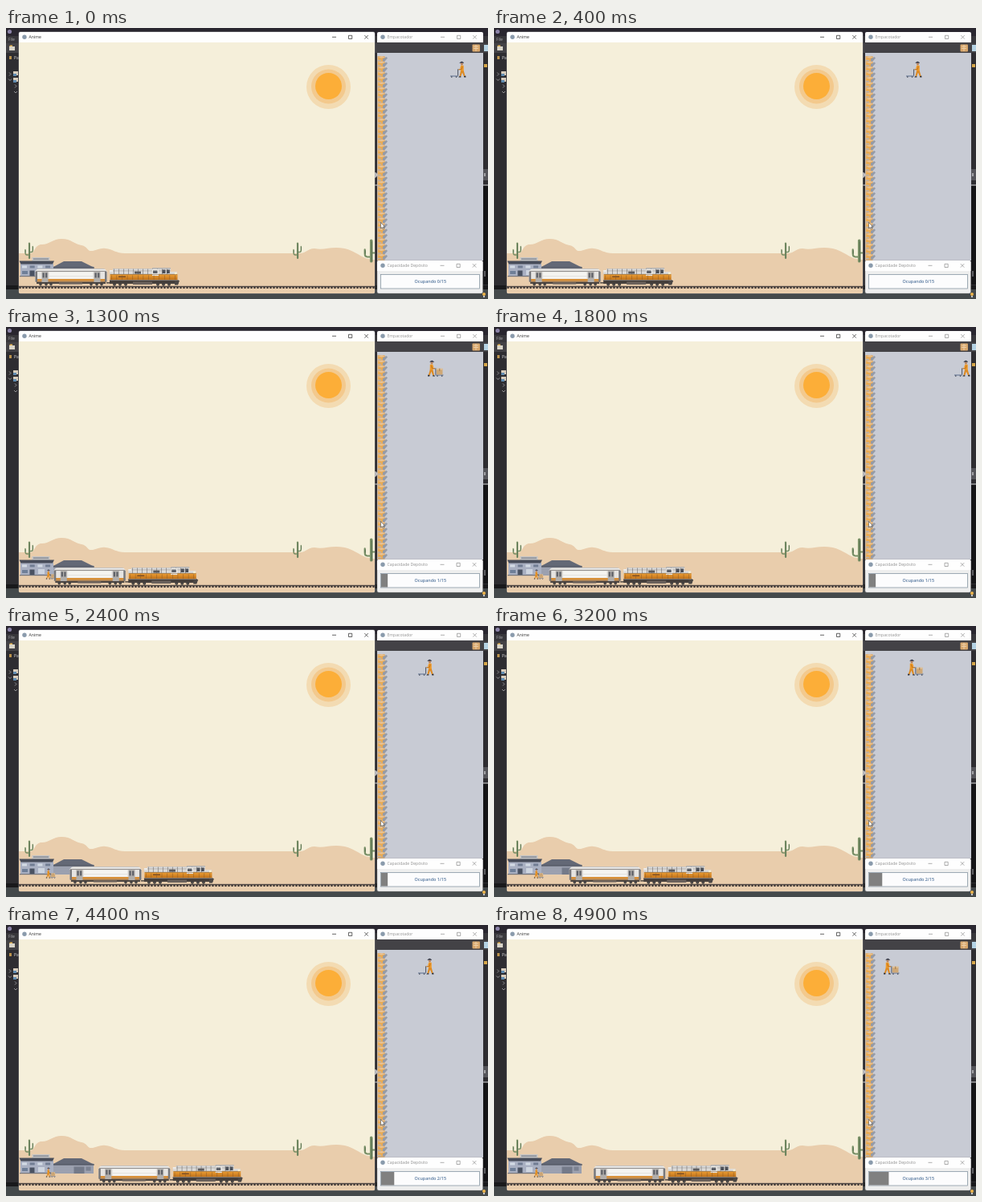
An HTML page that plays this animation: 600 by 338 pixels, repeating every 5 s.

```html
<!DOCTYPE html>
<html lang="pt">
<head>
<meta charset="utf-8">
<title>Anime</title>
<style>
html, body { margin: 0; width: 100%; height: 100%; overflow: hidden; background: #2d2c30; }
svg { display: block; width: 600px; height: 338px; }
text { font-family: "Open Sans", "Noto Sans", sans-serif; }
</style>
</head>
<body>
<svg id="stage" viewBox="0 0 600 338" xmlns="http://www.w3.org/2000/svg">
  <defs>
    <clipPath id="sceneClip"><rect x="16" y="5" width="443" height="326" rx="2"/></clipPath>
    <clipPath id="yardClip"><rect x="462" y="31" width="132" height="259"/></clipPath>
    <linearGradient id="roof" x2="0" y2="1">
      <stop stop-color="#aaa8a7"/><stop offset=".4" stop-color="#f0efed"/><stop offset="1" stop-color="#c9c7c5"/>
    </linearGradient>
    <linearGradient id="paint" x2="0" y2="1">
      <stop stop-color="#efa137"/><stop offset="1" stop-color="#bd6f18"/>
    </linearGradient>
    <g id="man">
      <path d="M3 2.2Q5.5-.6 7.6 1.7L8.8 2.7H3.2Z" fill="#2d3140"/>
      <path d="M4 2.7H7V4.6L6 5.6 4.2 5Z" fill="#b98663"/>
      <path d="M3.3 5.8 6.6 5.5 7.6 8.2 7 13H3.2Z" fill="#ef9a28"/>
      <path d="M3.2 12.5H7L8.6 19.6H6.8L5 14.5 3 19.4 1.4 19Z" fill="#dd8a22"/>
      <path d="M.8 18.6 3 19.2 2.7 20.4H.5ZM6.7 19.2H8.7L9.6 20.6H6.7Z" fill="#24262e"/>
      <path d="M4.8 7 6 10.4 9.6 10.9" fill="none" stroke="#c77a20" stroke-width="1.2"/>
    </g>
    <g id="cart">
      <path d="M10.4 10.4V18.7" stroke="#4b5261"/>
      <path d="M10 19H20" stroke="#73839d" stroke-width="1.3"/>
      <circle cx="12.5" cy="20.1" r=".8" fill="#3b4250"/><circle cx="18.2" cy="20.1" r=".8" fill="#3b4250"/>
    </g>
    <g id="box">
      <path d="M11.4 10.8H19V18.4H11.4Z" fill="#cfa876"/>
      <path d="M11.4 10.8H19V12.4H11.4Z" fill="#e0c29a"/>
      <path d="M14.6 10.8H15.8V14H14.6Z" fill="#ac834f"/>
    </g>
    <g id="cactus" fill="none" stroke="#788f66" stroke-linecap="round" stroke-linejoin="round">
      <path d="M7 20V1.5" stroke-width="2.2"/>
      <path d="M7 16H4Q2 16 2 13V9.5M7 12.5H9.5Q11.3 12.5 11.3 10V5.5" stroke-width="1.4"/>
      <path d="M7.5 20V2.5M2.3 13V10.5M11.6 10V6.5" stroke="#526b4c" stroke-width=".6"/>
    </g>
  </defs>

  <g id="desktop">
    <rect width="600" height="338" fill="#2e2d31"/>
    <rect width="600" height="10" fill="#29262f"/>
    <rect y="10" width="600" height="9" fill="#38373b"/>
    <rect y="19" width="600" height="12" fill="#434246"/>
    <rect x="594" y="196" width="6" height="124" fill="#141416"/>
    <rect y="321" width="600" height="5" fill="#19191b"/>
    <rect y="326" width="600" height="12" fill="#44494b"/>
    <circle cx="4.5" cy="4.5" r="2.6" fill="#8b83a8"/>
    <text x="3" y="16" font-size="5" fill="#a9a9ad">File</text>
    <rect x="4" y="23" width="7" height="5" fill="#d8d4c8"/>
    <path d="M4 23H8V21.5H5Z" fill="#e7b756"/>
    <rect x="4" y="35" width="3" height="4" fill="#b9914c"/>
    <text x="10" y="39" font-size="5" fill="#e0e0e2">Pa</text>
    <path d="M4 55.5 6 57.5 4 59.5M3 63.5 5 65.5 7 63.5M11 70.5 13 72.5 11 74.5M10 79 12 81 14 79" fill="none" stroke="#bdbdc1" stroke-width=".7"/>
    <path d="M9 54H15V59H9ZM9 62H15V67H9Z" fill="#d8cdbc"/>
    <path d="M9 57H13V60H9ZM9 65H13V68H9Z" fill="#608bb0"/>
    <rect x="594" y="176" width="6" height="14" fill="#55555a"/>
    <path d="M459 180Q462 180 462 183T459 187Z" fill="#c7c7ca"/>
    <path d="M595 181H597V185H595Z" fill="#a5a5a9"/>
    <path d="M459 196H462M594 196H600" stroke="#dedee0"/>
    <rect x="595" y="21" width="5" height="8" fill="#b5d3e4"/>
    <path d="M595 45H599V49H595Z" fill="#d9a94b"/>
    <path d="M596 303V310" stroke="#aaaab0"/>
    <circle cx="595" cy="332" r="2" fill="#f0b64c"/>
    <rect x="594" y="334" width="2" height="2" fill="#c7c7ca"/>
  </g>

  <rect x="15.6" y="4.6" width="443.8" height="326.8" rx="2.4" fill="#77777a"/>
  <g clip-path="url(#sceneClip)">
    <rect x="16" y="18" width="443" height="313" fill="#f5efda"/>
    <circle cx="401.5" cy="73.5" r="27.5" fill="#f3dbb2"/>
    <circle cx="401.5" cy="73" r="21.5" fill="#f3c98d"/>
    <circle cx="401.5" cy="72.5" r="16.5" fill="#fcae38"/>
    <path d="M16 281H31C36 280 35 272 43 270 53 271 58 263 69 263 82 263 85 270 94 271 103 273 100 279 108 278 114 277 117 274 124 275 133 276 137 281 148 281H366C374 281 375 275 384 275 394 277 401 274 411 274 425 274 430 278 438 282 446 287 452 289 459 289V331H16Z" fill="#e9cdac"/>
    <use href="#cactus" transform="translate(22 267)"/>
    <use href="#cactus" transform="translate(356 267)"/>
    <use href="#cactus" transform="translate(443.5 263) scale(1.6 1.4)"/>
    <g id="station"></g>
    <g id="track"></g>
    <g id="porter" transform="translate(49.5 302) scale(.61)">
      <use href="#man"/><use href="#cart"/><use href="#box"/>
    </g>
    <g id="train"></g>
  </g>

  <g id="yard">
    <rect x="462" y="31" width="132" height="259" fill="#c8cbd4"/>
    <rect x="462" y="18" width="132" height="13" fill="#434246"/>
    <rect x="580.5" y="20.5" width="9.5" height="9" rx="1" fill="#d7a66b"/>
    <path d="M582 23H588M582 25.5H588M585 21V29" stroke="#f2d9b5" stroke-width=".8"/>
    <g clip-path="url(#yardClip)">
      <g id="crates"></g>
      <g id="worker">
        <g id="body"><use href="#man"/><use href="#cart"/><use id="load" href="#box"/></g>
      </g>
    </g>
    <path d="M466.5 242.5V250L468.2 248.5 469.3 251 470.5 250.4 469.4 248.1H471.5Z" fill="#fff" stroke="#222" stroke-width=".5"/>
  </g>

  <g id="gauge">
    <rect x="462" y="290" width="131.5" height="41" rx="2" fill="#eeeeee" stroke="#88888c" stroke-width=".4"/>
    <rect x="466.5" y="307.5" width="123" height="17.5" fill="#fcfcfd" stroke="#7a8a99" stroke-width=".7"/>
    <rect id="fill" x="467" y="308" height="16.5" fill="#808080"/>
    <text id="label" x="528.3" y="318.2" text-anchor="middle" font-size="5.4" font-weight="600" fill="#55779f"></text>
  </g>
  <g id="windows"></g>
</svg>
<script>
const el = id => document.getElementById(id);
const rect = (x, y, w, h, fill, extra = "") =>
  `<rect x="${x}" y="${y}" width="${w}" height="${h}" fill="${fill}" ${extra}/>`;
const path = (d, fill) => `<path d="${d}" fill="${fill}"/>`;
const repeat = (n, part) => Array.from({ length: n }, (_, i) => part(i)).join("");

function titleBar(x, y, w, name, ink) {
  const cy = y + 6.3, r = x + w;
  return path(`M${x} ${y + 13}v-11q0-2 2-2h${w - 4}q2 0 2 2v11z`, "#fefefe") +
    `<circle cx="${x + 7}" cy="${cy}" r="2.7" fill="#8a9bac"/>
    <text x="${x + 12.5}" y="${cy + 1.8}" font-size="5.1" fill="${ink}">${name}</text>
    <path d="M${r - 53} ${cy}h5M${r - 32.5} ${cy - 2}h4.2v4.2h-4.2zM${r - 12.7} ${cy - 2.2}l4.5 4.5m0-4.5l-4.5 4.5"
      fill="none" stroke="${ink}" stroke-width=".75"/>`;
}

el("windows").innerHTML =
  titleBar(16, 5, 443, "Anime", "#333") +
  titleBar(462, 5, 132, "Empacotador", "#929292") +
  titleBar(462, 290, 131.5, "Capacidade Depósito", "#929292");

el("station").innerHTML =
  rect(59, 297.5, 50, 12.5, "#9fa4b2") +
  repeat(5, i => rect(59, 300 + i * 2, 50, .4, "#8d93a2")) +
  path("M57 299 72 291H94L110 299Z", "#636876") +
  path("M57 298.4H110V299.4H57Z", "#474b56") +
  rect(84.5, 301.5, 13, 8.5, "#747a89") + rect(99.5, 301.5, 6, 5, "#7c8291") +
  rect(18, 294, 41, 16, "#a9b0c2") +
  rect(32.5, 286, 22, 5, "#c5c5c6") + rect(34, 287.4, 19, 1.4, "#858a93") +
  path("M16.5 290.6H60L58 294.5H18.5Z", "#474c59") +
  repeat(4, i => rect(20 + i * 9.7, 296.4, 6, 3, i % 2 ? "#727e94" : "#d3dbe5")) +
  rect(29.5, 302.5, 6, 7.5, "#4a5262") + rect(20, 303, 7, 4, "#6f7f98") +
  rect(40, 302, 8, 6, "#ced5df") + rect(17, 309, 43, 1.2, "#74767d");

el("track").innerHTML =
  repeat(112, i => rect(16.4 + i * 4, 322.8, 2.2, 2.2, "#3b3432")) +
  rect(16, 321.8, 443, 1.5, "#4b4340");

const wheel = (x, r = 1.7) =>
  `<circle cx="${x}" cy="319.8" r="${r}" fill="#383534"/><circle cx="${x}" cy="319.8" r=".6" fill="#8d8885"/>`;

function coach() {
  const door = x => rect(x, 304.2, 8, 12.8, "#b1aeab") +
    rect(x + 1, 305.4, 2.2, 6, "#5e6067") + rect(x + 4.6, 305.4, 2.2, 6, "#5e6067");
  return rect(2, 316, 86, 3, "#4b4644") +
    rect(.5, 302.5, 89, 14.5, "#e6e4e1", 'rx="1"') +
    path("M1 303.5Q2 300 5 300H85Q88 300 89 303.5Z", "url(#roof)") +
    rect(1, 303, 88, .8, "#858180") +
    rect(18, 304.6, 54, 8, "#f5f4f1") +
    rect(18, 309, 54, .5, "#cfccc8") +
    rect(1, 313, 88, 2.6, "#d98f35") + rect(1, 315.6, 88, 1.2, "#8f602f") +
    door(8.5) + door(73.5) +
    rect(.5, 304, 2.5, 12.5, "#77777a") + rect(87, 304, 2.5, 12.5, "#77777a") +
    rect(30, 317, 29, 2.6, "#6c625b") +
    [7, 14, 20, 70, 77, 83].map(x => wheel(x)).join("");
}

function engine() {
  return rect(89, 317.2, 5, 1.3, "#3a3736") +
    rect(93, 314, 85.5, 5, "#453f3c") +
    path("M93 307.5V302H97V300H146V299H169V304H177V307.5Z", "url(#roof)") +
    rect(97, 302.6, 72, .7, "#85817e") +
    repeat(12, i => rect(98 + i * 6, 300.5, .6, 6.5, "#6f6c6b")) +
    rect(93.5, 307, 84, 7.5, "url(#paint)") +
    rect(124, 303.6, 8, 3, "#5d5c5e") +
    rect(146, 301, 8, 8, "#eceae6") + rect(147, 302.5, 5.5, 3.5, "#5d6067") +
    rect(158.5, 301.5, 4, 4.5, "#4c5058") + rect(164, 301.5, 3.8, 4.5, "#4c5058") +
    rect(174, 305, 2.5, 2.5, "#fff0c8") +
    rect(94, 307, 83, .6, "#8a6a45") +
    rect(104, 309.5, 9, 1.4, "#784a20") +
    repeat(13, i => rect(95 + i * 6.6, 308.5, .5, 5.5, "#8a5b28")) +
    rect(93, 314, 85, .8, "#918b86") +
    path("M174 315H180L178 320.5H174Z", "#4b4745") +
    rect(122, 316.5, 24, 3.5, "#6a615b") +
    [99, 106, 113, 153, 160, 167].map(x => wheel(x, 1.9)).join("");
}
el("train").innerHTML = coach() + engine();

el("crates").innerHTML = rect(462.5, 35, 9, 255, "#d6ab76") + repeat(39, i => {
  const y = 35 + i * 6.5;
  return path(`M463 ${y + 1}l5-1 4 1.5v3l-4 1.5-5-1z`, "#e9ab55") +
    path(`M463 ${y + 1}l5-1 4 1.5-5 1z`, "#e6c39a") +
    path(`M469 ${y + 3.5}l4.5-2.5 1.5 1.5-3.5 4h-2.5z`, "#959ba7") +
    path(`M463 ${y + 4.8}h4v1.3h-4z`, "#b9b3ae");
});

const LOOP = 5000, STEP = 100;
const PICKUPS = [900, 2900, 4900];

function draw(t) {
  const leg = (t + 1200) % 2000;
  const loaded = leg < 1000;
  const x = loaded ? 474.5 + leg / 10 : 673 - leg / 10;
  const count = PICKUPS.filter(p => t >= p).length;

  el("train").setAttribute("transform", `translate(${36 + t * .0179} 0)`);
  el("worker").setAttribute("transform", `translate(${x} 41)`);
  el("body").setAttribute("transform", loaded ? "" : "translate(20 0) scale(-1 1)");
  el("load").setAttribute("visibility", loaded ? "visible" : "hidden");
  el("porter").setAttribute("visibility", count ? "visible" : "hidden");
  el("fill").setAttribute("width", count * 122 / 15);
  el("label").textContent = `Ocupando ${count}/15`;
}

const start = performance.now();
function tick() {
  const t = (performance.now() - start) % LOOP;
  draw(Math.floor(t / STEP) * STEP);
  requestAnimationFrame(tick);
}
draw(0);
requestAnimationFrame(tick);
</script>
</body>
</html>
```
